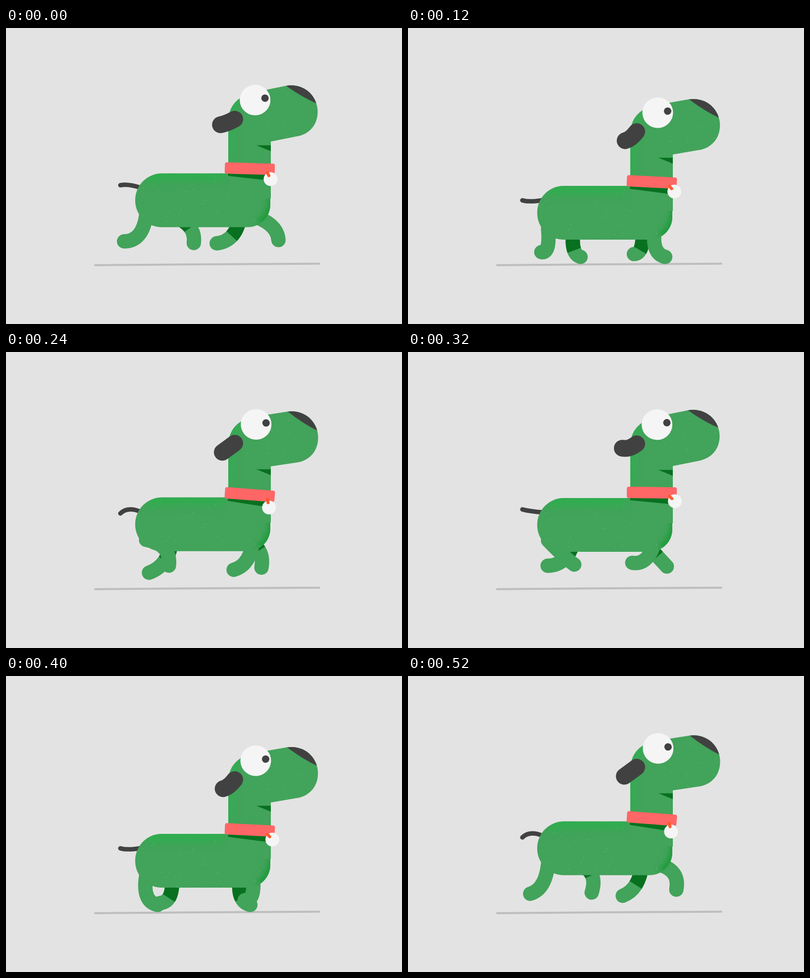
Write an HTML page with a canvas that moves like this. It is 800 px wide and 600 px high and loops after 560 ms.

```html
<!DOCTYPE html>
<html>
<head>
<meta charset="utf-8">
<title>Trotting dog</title>
<style>
html, body { margin: 0; height: 100%; overflow: hidden; background: #e3e3e3; }
canvas { display: block; }
</style>
</head>
<body>
<canvas id="stage" width="800" height="600"></canvas>
<script>
const ctx = document.getElementById('stage').getContext('2d');
const STRIDE = 560, STEP = 40, BEAT = STRIDE / 2;
const GREEN = '#42a35a', SHADE = '#07711f', COAL = '#414141', WHITE = '#f5f5f5';
const RAD = Math.PI / 180;
const cosDeg = a => Math.cos(a * RAD);

const BODY = new Path2D();
BODY.roundRect(261, 294, 273, 109, [54, 0, 46, 54]);
const NECK = new Path2D('M449 345 V190 Q449 152 482 136 L535 160 V345 Z');
const MUZZLE = new Path2D('M480 138 L527 125 L565 118 C604 111 630 140 630 170 C630 200 610 216 590 220 L535 230 L480 240 Z');
const NOSE = new Path2D('M566 117 Q600 142 629 155 L650 100 Z');

// Each foot swings around footX; diagonal legs share a phase in degrees.
const LEGS = [
  { hip: 335, footX: 330, lower: 6, phase: 0, far: true },
  { hip: 473, footX: 475, lower: 4, phase: 180, far: true },
  { hip: 283, footX: 288, lower: 0, phase: 180 },
  { hip: 499, footX: 501, lower: 0, phase: 0 }
];

// Rises from 0 to 1 and back once per beat, highest at the time "peak".
function pulse(t, peak, sharpness) {
  return ((1 + Math.cos(2 * Math.PI * (t - peak) / BEAT)) / 2) ** sharpness;
}

function fill(path, color) {
  ctx.fillStyle = color;
  ctx.fill(path);
}

function disc(x, y, r, color) {
  const p = new Path2D();
  p.arc(x, y, r, 0, 7);
  fill(p, color);
}

function stroke(d, color, width, cap = 'round') {
  ctx.strokeStyle = color;
  ctx.lineWidth = width;
  ctx.lineCap = cap;
  ctx.lineJoin = 'round';
  ctx.stroke(new Path2D(d));
}

function glow(clip, d, color, width, blur) {
  ctx.save();
  ctx.clip(clip);
  ctx.filter = `blur(${blur}px)`;
  stroke(d, color, width);
  ctx.restore();
}

function turned(x, y, degrees, draw) {
  ctx.save();
  ctx.translate(x, y);
  ctx.rotate(degrees * RAD);
  draw();
  ctx.restore();
}

// Faint paper grain on the coat.
function specks(clip, x, y, w, h, count) {
  ctx.save();
  ctx.clip(clip);
  let seed = 7;
  const rnd = () => (seed = seed * 16807 % 2147483647) / 2147483647;
  for (let i = 0; i < count; i++) {
    disc(x + rnd() * w, y + rnd() * h, 0.5 + rnd() * 0.7, 'rgba(160,215,165,.25)');
  }
  ctx.restore();
}

// The thigh swings from the hip and the foot follows its own loop down to the ground.
function leg({ hip, footX, lower, phase, far }, t, drop) {
  const a = 360 * t / STRIDE + phase;
  const thigh = (17 + 43 * cosDeg(a + 22) + 20 * cosDeg(2 * (a + 22))) * RAD;
  const hipY = 380 + drop;
  const kneeX = hip + 52 * Math.sin(thigh), kneeY = hipY + 52 * Math.cos(thigh);
  const x = footX + 50 * cosDeg(a - 9);
  const y = 434 + lower + drop + 7 * cosDeg(a - 101) + 7 * cosDeg(2 * a - 239);
  const d = `M${hip} ${hipY} Q${kneeX} ${kneeY} ${x} ${Math.min(y, 464)}`;
  stroke(d, GREEN, 29);
  if (!far) return;
  ctx.setLineDash([45, 999]);
  stroke(d, SHADE, 29, 'butt');
  ctx.setLineDash([]);
}

function tail(t) {
  const bendY = 312 + 16 * pulse(t, 105, 1), tipY = 317 + 23 * pulse(t, 185, 2.2);
  stroke(`M272 323 Q246 ${bendY} 231 ${tipY}`, COAL, 9);
}

function head() {
  ctx.translate(-490, -190);
  fill(MUZZLE, GREEN);
  specks(MUZZLE, 480, 120, 150, 110, 50);
  ctx.save();
  ctx.clip(MUZZLE);
  fill(NOSE, COAL);
  ctx.restore();
  disc(504, 145.5, 31, WHITE);
  disc(524, 142, 7.5, COAL);
}

function ear(t) {
  const x = 433 + 13 * pulse(t, 175, 2), y = 193 + 17 * pulse(t, 180, 1.2);
  const sag = 9 * pulse(t, 75, 1.5);
  stroke(`M462 184 Q${(462 + x) / 2} ${(184 + y) / 2 + sag} ${x} ${y}`, COAL, 34);
}

function collar() {
  fill(new Path2D('M-43.5 0 H42 V23 L30 22 L-43.5 16 Z'), SHADE);
  const band = new Path2D();
  band.roundRect(-50.5, -11.5, 101, 23, 4);
  fill(band, '#ff6666');
}

function collarAndTag(t) {
  const tilt = 0.8 + 5.8 * pulse(t, 190, 1.5);
  const y = 281.8 + 1.5 * tilt;
  turned(492.5, y, tilt, collar);

  const tagX = 531 + 10 * pulse(t, 75, 1.3), tagY = 300 + 19 * pulse(t, 200, 1.3);
  const ringY = y + 7 + tilt * 0.6;
  const lean = Math.atan2(tagY - ringY, tagX - 528);
  disc(tagX, tagY, 14, WHITE);
  stroke(`M528 ${ringY} l${7 * Math.cos(lean)} ${7 * Math.sin(lean)}`, '#ff5a2b', 6);
}

function draw(t) {
  const drop = 0.8 + 25.2 * pulse(t, 120, 3.2);
  const nod = -1.2 + 8 * pulse(t, 185, 2.5);

  ctx.fillStyle = '#e3e3e3';
  ctx.fillRect(0, 0, 800, 600);
  stroke('M180 480.7 L400 479 L633 477.7', '#bdbdbd', 4);
  for (const l of LEGS) leg(l, t, drop);

  ctx.save();
  ctx.translate(0, drop);
  tail(t);
  fill(BODY, GREEN);
  glow(BODY, 'M292 304 Q305 298 325 298 H435', '#2ab04b', 18, 9);
  glow(BODY, 'M537 315 V350 Q535 375 515 392', '#159a35', 12, 6);
  specks(BODY, 261, 294, 273, 109, 90);

  fill(NECK, GREEN);
  glow(NECK, 'M452 262 V190 Q453 160 472 145', '#30ae50', 14, 8);
  fill(new Path2D('M506 237 H535 V249 Z'), SHADE);
  turned(490, 190, nod, head);
  ear(t);
  collarAndTag(t);
  ctx.restore();
}

function tick() {
  const t = performance.now() % STRIDE;
  draw(Math.floor(t / STEP) * STEP);
  requestAnimationFrame(tick);
}
tick();
</script>
</body>
</html>
```
